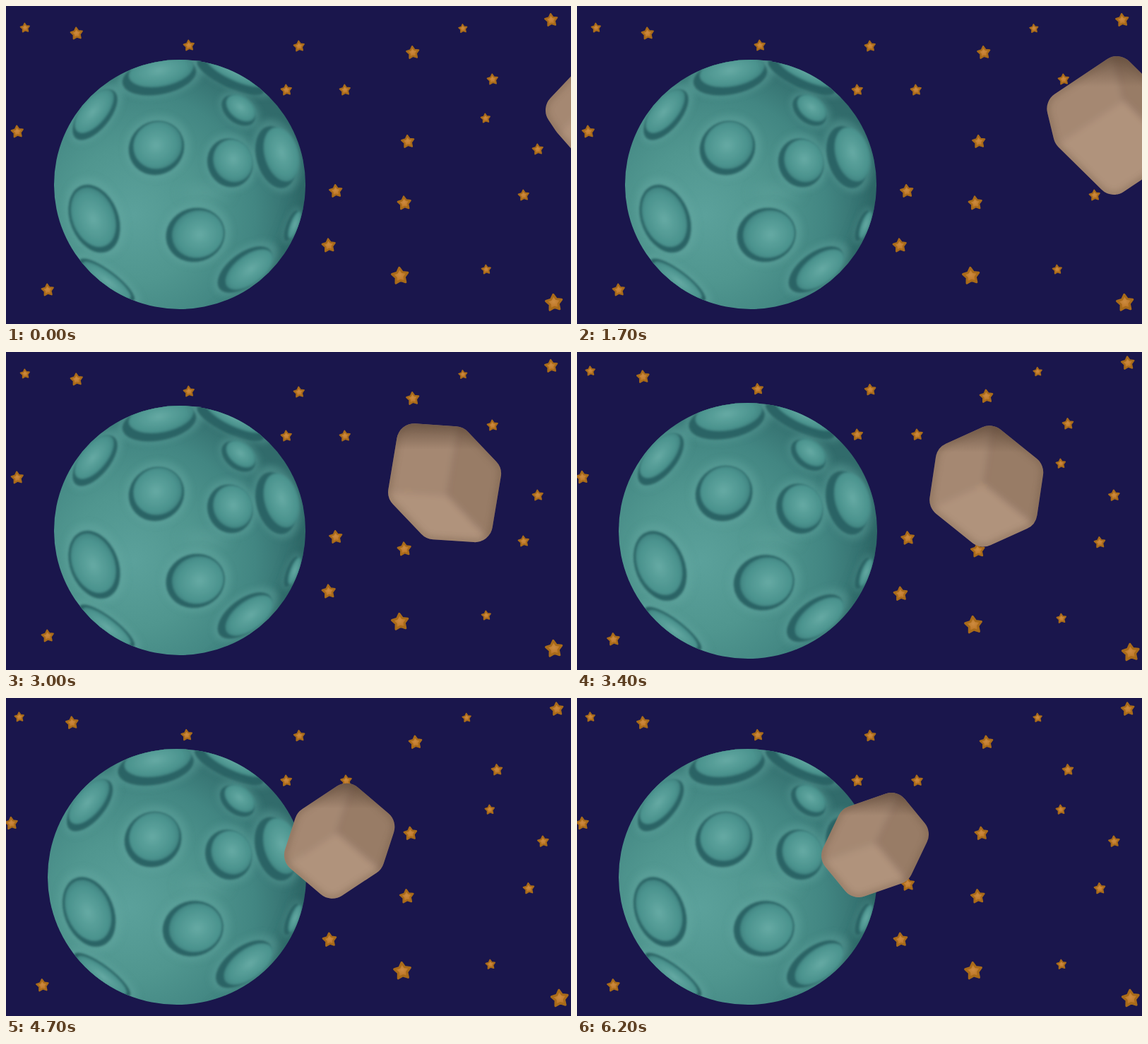
An HTML page that plays this animation: 800 by 450 pixels, repeating every 6.3 s.

```html
<!DOCTYPE html>
<html lang="en">
<head>
<meta charset="utf-8">
<title>Planet and asteroid</title>
<style>
  html, body { margin: 0; width: 100%; height: 100%; overflow: hidden; background: #1a164c; }
  svg { display: block; width: 800px; height: 450px; }
</style>
</head>
<body>
<svg viewBox="0 0 800 450">
  <defs>
    <filter id="soft2" x="-50%" y="-50%" width="200%" height="200%"><feGaussianBlur stdDeviation="1.6"/></filter>
    <filter id="soft5" x="-100%" y="-100%" width="300%" height="300%"><feGaussianBlur stdDeviation="5"/></filter>
    <filter id="soft10" x="-60%" y="-60%" width="220%" height="220%"><feGaussianBlur stdDeviation="10"/></filter>

    <radialGradient id="gold" cx=".5" cy=".45" r=".55">
      <stop offset="0" stop-color="#cd8b40"/><stop offset=".6" stop-color="#c07a2b"/><stop offset="1" stop-color="#a46617"/>
    </radialGradient>
    <radialGradient id="sphere" gradientUnits="userSpaceOnUse" cx="180" cy="295" r="240">
      <stop offset="0" stop-color="#5ba19b"/><stop offset=".4" stop-color="#50968f"/>
      <stop offset=".72" stop-color="#428682"/><stop offset="1" stop-color="#316b6b"/>
    </radialGradient>
    <radialGradient id="floor" cx=".52" cy=".47" r=".56">
      <stop offset="0" stop-color="#66aaa4"/><stop offset=".35" stop-color="#589f99"/>
      <stop offset=".75" stop-color="#4b938e"/><stop offset="1" stop-color="#3d817e"/>
    </radialGradient>
    <linearGradient id="shade" x2="0" y2="1">
      <stop offset="0" stop-color="#3f2c20" stop-opacity=".5"/><stop offset=".22" stop-color="#3f2c20" stop-opacity="0"/>
    </linearGradient>

    <path id="star"/>
    <ellipse id="globe" cx="246" cy="252.5" rx="178" ry="176.5"/>
    <clipPath id="globeClip"><use href="#globe"/></clipPath>
    <clipPath id="rockClip"><path class="body"/></clipPath>
  </defs>

  <rect width="800" height="450" fill="#1a164c"/>
  <g id="stars" fill="url(#gold)" stroke="#a86a19" stroke-width="2.4" stroke-linejoin="round"></g>

  <g id="planet">
    <use href="#globe" fill="url(#sphere)"/>
    <g id="craters" clip-path="url(#globeClip)">
      <path d="M424,180 C420,330 360,400 290,440 L450,440 Z" fill="#28605f" opacity=".5" filter="url(#soft10)"/>
      <ellipse cx="282" cy="264" rx="34" ry="10" fill="#69aba4" opacity=".4" filter="url(#soft10)"/>
    </g>
  </g>

  <g clip-path="url(#rockClip)">
    <g id="faces" filter="url(#soft5)">
      <polygon fill="#a58872"/><polygon fill="#987b66"/><polygon fill="#b0937c"/>
    </g>
    <path class="body" fill="url(#shade)"/>
    <path class="body" fill="none" stroke="#6b5240" stroke-width="6" opacity=".5" filter="url(#soft5)"/>
  </g>
</svg>

<script>
const LOOP = 6300, STEP = 100, TRAVEL = 6200, CAMERA_CUT = 3200;
const $ = id => document.getElementById(id);
const add = (parent, name, attrs) => {
  const el = document.createElementNS('http://www.w3.org/2000/svg', name);
  for (const k in attrs) el.setAttribute(k, attrs[k]);
  return parent.appendChild(el);
};
const mix = (a, b, u) => a + (b - a) * u;
const ease = p => p * p * (3 - 2 * p);
const sum = (...vs) => vs.reduce(([x, y], [dx, dy]) => [x + dx, y + dy]);
const mul = ([x, y], k) => [x * k, y * k];

// Stars: x, y, radius
const stars = [
  [27, 31, 7], [100, 39, 9], [259, 56, 8], [415, 57, 8], [576, 66, 9.5], [647, 32, 6.5],
  [772, 20, 9.5], [689, 104, 8], [397, 119, 8], [480, 119, 8], [679, 159, 7], [569, 192, 9.5],
  [753, 203, 8], [16, 178, 9], [467, 262, 9.5], [564, 279, 10], [733, 268, 8], [457, 339, 10],
  [558, 382, 12.5], [680, 373, 7], [776, 420, 12.5], [59, 402, 9]
];
const tips = Array.from({ length: 10 }, (_, i) => {
  const a = i * Math.PI / 5 - Math.PI / 2 - 0.1, r = i % 2 ? 4.9 : 9;
  return [r * Math.cos(a), r * Math.sin(a)].map(v => v.toFixed(2)).join();
});
$('star').setAttribute('d', `M${tips.join('L')}Z`);
for (const [x, y, r] of stars)
  add($('stars'), 'use', { href: '#star', transform: `translate(${x} ${y}) scale(${r / 9.6})` });

// Craters: x, y, radius; foreshortened towards the planet's limb
const craters = [
  [217, 100, 53], [318, 100, 52], [126, 154, 43], [213, 201, 40], [317, 222, 35], [329, 148, 27],
  [382, 214, 45], [268, 324, 42], [125, 301, 50], [338, 373, 45], [404, 311, 23], [143, 388, 48]
];
for (const [x, y, r] of craters) {
  const ox = (x - 246) / 178, oy = (y - 252.5) / 176.5, d = Math.hypot(ox, oy);
  const squash = Math.sqrt(1 - d * d), angle = Math.atan2(oy, ox) * 180 / Math.PI;
  const oval = (k, dx, dy, fill, blur, opacity = 1) => add($('craters'), 'ellipse', {
    rx: r * k * squash, ry: r * k, fill, opacity, filter: `url(#${blur})`,
    transform: `translate(${x + dx * r} ${y + dy * r}) rotate(${angle})`
  });
  oval(1.18, 0.04, -0.04, '#68aba4', 'soft5', 0.4);
  oval(1, 0, 0, '#2a6465', 'soft2');
  oval(0.88, 0.07 + 0.14 * ox, -0.07 + 0.1 * oy, 'url(#floor)', 'soft2');
}

// The asteroid is a rounded box: three projected edges, eased between a few poses
const ROUND = 25;
const poses = [
  { at: 0,     edges: [[72, 82], [74, -78], [-10, -15]] },
  { at: 0.334, edges: [[52, 42], [74, -26], [-8, -54]] },
  { at: 0.476, edges: [[40, 42], [58, 4], [12, -72]] },
  { at: 0.667, edges: [[62, 40], [45, -50], [5, -42]] },
  { at: 1,     edges: [[28, 34], [52, -18], [22, -46]] }
];

function edgesAt(s) {
  const i = Math.max(1, poses.findIndex(p => p.at >= s));
  const p = poses[i - 1], q = poses[i], u = (s - p.at) / (q.at - p.at);
  return p.edges.map((e, k) => e.map((v, j) => mix(v, q.edges[k][j], u)));
}

// Polygon grown by ROUND, with arcs at its corners
function rounded(pts) {
  const sides = pts.map((p, i) => {
    const q = pts[(i + 1) % pts.length], dx = q[0] - p[0], dy = q[1] - p[1];
    const n = mul([dy, -dx], ROUND / Math.hypot(dx, dy));
    return [sum(p, n), sum(q, n)];
  });
  return 'M' + sides.map(([p, q]) => `${p}L${q}`).join(`A${ROUND},${ROUND} 0 0 1 `) +
    `A${ROUND},${ROUND} 0 0 1 ${sides[0][0]}Z`;
}

const bodies = document.querySelectorAll('.body');
const faces = [...$('faces').children];

function drawRock(s) {
  const depth = 1.361 * s / (1 + 0.361 * s);
  const centre = [mix(867, 422, depth), mix(157, 208, depth)];
  const [a, b, c] = edgesAt(s);
  const left = sum(centre, mul(sum(a, b, c), -0.5));
  const d = rounded([left, sum(left, c), sum(left, c, b), sum(left, a, b, c), sum(left, a, b), sum(left, a)]);
  bodies.forEach(el => el.setAttribute('d', d));

  const near = sum(left, b), back = mul(b, -1);
  [[back, c], [c, a], [a, back]].forEach(([p, q], i) => {
    const P = mul(p, 3), Q = mul(q, 3);
    faces[i].setAttribute('points', [near, sum(near, P), sum(near, P, Q), sum(near, Q)].join(' '));
  });
}

function draw(t) {
  const close = t >= CAMERA_CUT;
  $('stars').setAttribute('transform', close ? 'matrix(1.0215 0 0 1.0237 -8.6 -4.7)' : '');
  $('planet').setAttribute('transform', close ? 'matrix(1.028 0 0 1.0255 -10.9 -5.9)' : '');
  drawRock(ease(Math.min(t / TRAVEL, 1)));
}

const start = performance.now();
function frame() {
  const t = (performance.now() - start) % LOOP;
  draw(Math.floor(t / STEP) * STEP);
  requestAnimationFrame(frame);
}
frame();
</script>
</body>
</html>
```
